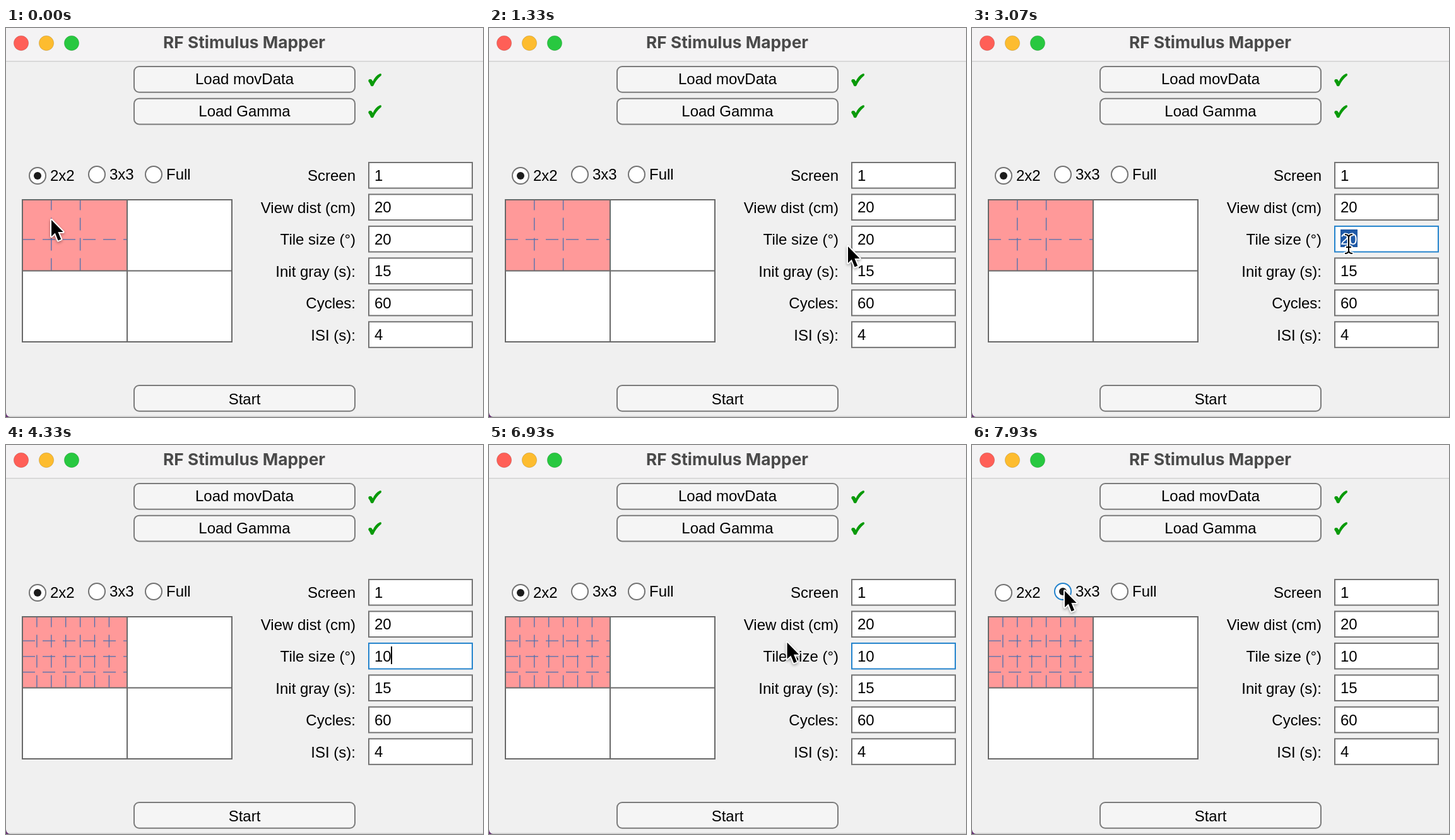
An HTML page that plays this animation: 756x616 px, repeating every 8 s.

```html
<!DOCTYPE html>
<html lang="en">
<head>
<meta charset="utf-8">
<title>RF Stimulus Mapper</title>
<style>
  html, body { margin: 0; width: 100%; height: 100%; overflow: hidden; background: #f0f0f0; }
  svg { display: block; width: 100vw; height: 100vh; }
  text { font: 24px "Liberation Sans", Arial, sans-serif; fill: #000; }
  .title { font: 700 26.3px Inter, sans-serif; fill: #4a4a4a; }
  .middle { text-anchor: middle; }
  .end { text-anchor: end; }
  .light { stroke: #0002; }
  .button { fill: #f5f5f5; stroke: #7b7b7b; stroke-width: 2; }
  .check { fill: #0a9a0a; stroke: #0a9a0a; stroke-width: 1.4; stroke-linejoin: round; }
  .field, .radio { fill: #fff; stroke: #737373; stroke-width: 2; }
  .focus { stroke: #2483cc; }
  .frame { fill: none; stroke: #696969; stroke-width: 2; }
  #tiles { fill: none; stroke: #4a70b0; stroke-width: 1.3; stroke-dasharray: 20 12; }
  #beam path { fill: none; stroke: #fff; stroke-width: 5; stroke-linecap: round; }
  #beam path + path { stroke: #000; stroke-width: 2; stroke-linecap: butt; }
  #arrow { fill: #000; stroke: #fff; stroke-width: 4; stroke-linejoin: round; paint-order: stroke;
           filter: drop-shadow(0 2px 2px #0005); }
</style>
</head>
<body>
<svg viewBox="0 0 756 616" preserveAspectRatio="none">
  <rect width="756" height="616" fill="#f0f0f0"/>
  <rect width="756" height="52" fill="#f4f3f4"/>
  <rect y="52" width="756" height="1.5" fill="#d2d2d2"/>
  <rect y="614.5" width="756" height="1.5" fill="#cdcdcd"/>
  <path d="M0 609Q1 615 6 616H0Z" fill="#673075"/>
  <circle class="light" cx="24" cy="24" r="11.7" fill="#ff5f57"/>
  <circle class="light" cx="64" cy="24" r="11.7" fill="#fdbc2f"/>
  <circle class="light" cx="104" cy="24" r="11.7" fill="#28c840"/>
  <text class="title middle" x="377.5" y="32">RF Stimulus Mapper</text>

  <g id="form"></g>

  <rect x="26" y="272" width="332" height="225" fill="#fff"/>
  <rect x="26" y="272" width="166" height="112.5" fill="#ff9999"/>
  <path id="tiles"/>
  <path class="frame" d="M26 272H358V497H26ZM192 272V497M26 384.5H358"/>

  <rect id="selection" x="584" y="319" width="27" height="28" fill="#1f59a6"/>
  <text id="value" x="584" y="342.6"></text>
  <rect id="caret" x="610" y="319" width="2" height="28"/>

  <g id="beam"></g>
  <path id="arrow" d="M0 0V26L5.8 20.6L10.6 32.4L15.2 30.4L10.4 19H18.6Z"/>
</svg>
<script>
const LOOP = 8000;
const $ = id => document.getElementById(id);
const show = (id, on) => $(id).style.display = on ? '' : 'none';

// Times of the actions, in ms
const CLICK = 2000, SELECT = 2200, TYPE_ONE = 4000, TYPE_ZERO = 4200,
      POINTER_BACK = 6270, PICK_RADIO = 7750;
const CARET_OFF = [[4670, 5200], [5670, 6130], [6670, 7130]];

// Pointer stops: time, x, y
const PATH = [
  [0, 72, 304], [930, 72, 304], [1330, 569, 346], [1730, 597, 342],
  [6670, 597, 342], [7400, 171, 242], [7530, 169, 241], [7750, 147, 231], [LOOP, 147, 231]
];

const text = (x, y, content, cls = '') => `<text class="${cls}" x="${x}" y="${y}">${content}</text>`;

const button = (y, label, baseline) =>
  `<rect class="button" x="203" y="${y}" width="350" height="40.7" rx="8"/>` +
  text(378, baseline, label, 'middle');

const check = y => `<path class="check" transform="translate(574 ${y})"
  d="M1 12C1 9 5 9 6 11.5L7.5 14C10 8 14 3 19 1Q21 .5 20 3C14 8 10 14 8 18.5C7.5 20 5 20 4.5 18.5C3.5 15.5 2.5 14 1 12Z"/>`;

const radio = (id, x, y, label) =>
  `<circle id="${id}" class="radio" cx="${x}" cy="${y}" r="13"/>` +
  `<circle id="${id}Dot" cx="${x}" cy="${y}" r="6" fill="#1c1c1c"/>` +
  text(x + 20, y + 8, label);

const field = ([label, value], i) => {
  const y = 213 + 50.45 * i;
  return text(554, y + 29.4, label, 'end') +
    `<rect id="field${i}" class="field" x="575" y="${y}" width="164" height="40.6"/>` +
    text(584, y + 28.8, value);
};

$('form').innerHTML =
  button(61, 'Load movData', 89) + check(72) +
  button(111.7, 'Load Gamma', 140) + check(122) +
  button(566, 'Start', 596) +
  radio('two', 50, 234, '2x2') + radio('three', 144, 232, '3x3') + radio('full', 234, 232, 'Full') +
  [['Screen', 1], ['View dist (cm)', 20], ['Tile size (°)', ''],
   ['Init gray (s):', 15], ['Cycles:', 60], ['ISI (s):', 4]].map(field).join('');

const beamShape = 'M-6-15Q0-15 0-10V10Q0 15-6 15M6-15Q0-15 0-10M0 10Q0 15 6 15M-4 5H4';
$('beam').innerHTML = `<path d="${beamShape}"/>`.repeat(2);
show('fullDot', false);

// Whole tiles counted from the lower left corner, inner borders only
function tileLines(degrees) {
  const w = degrees * 2.29, h = degrees * 2.48;
  let d = '';
  for (let i = 1; i < Math.floor(166 / w); i++) d += `M${26 + i * w} 384.5V272`;
  for (let i = 1; i < Math.floor(112.5 / h); i++) d += `M26 ${384.5 - i * h}H192`;
  return d;
}

function pointerAt(t) {
  const next = Math.max(1, PATH.findIndex(stop => stop[0] > t));
  const [t0, x0, y0] = PATH[next - 1], [t1, x1, y1] = PATH[next];
  const p = (t - t0) / (t1 - t0), eased = p * p * (3 - 2 * p);
  return [x0 + (x1 - x0) * eased, y0 + (y1 - y0) * eased];
}

let shownValue;
function draw(t) {
  const value = t < TYPE_ONE ? '20' : t < TYPE_ZERO ? '1' : '10';
  if (value !== shownValue) {
    shownValue = value;
    $('value').textContent = value;
    $('tiles').setAttribute('d', tileLines(+value));
  }

  const focused = t >= CLICK && t < PICK_RADIO;
  const selected = t >= SELECT && t < TYPE_ONE;
  const picked = t >= PICK_RADIO;
  $('field2').classList.toggle('focus', focused);
  $('value').style.fill = selected ? '#fff' : '#000';
  show('selection', selected);
  $('caret').setAttribute('x', value === '1' ? 597 : 610);
  show('caret', focused && !selected && !CARET_OFF.some(([from, to]) => t >= from && t < to));

  show('twoDot', !picked);
  show('threeDot', picked);
  $('three').classList.toggle('focus', picked);

  const [x, y] = pointerAt(t);
  const visible = t < TYPE_ONE || t >= POINTER_BACK;
  const overField = x > 575;
  show('beam', visible && overField);
  show('arrow', visible && !overField);
  for (const id of ['beam', 'arrow']) $(id).setAttribute('transform', `translate(${x} ${y})`);
}

function tick() {
  draw(performance.now() % LOOP);
  requestAnimationFrame(tick);
}
tick();
</script>
</body>
</html>
```
